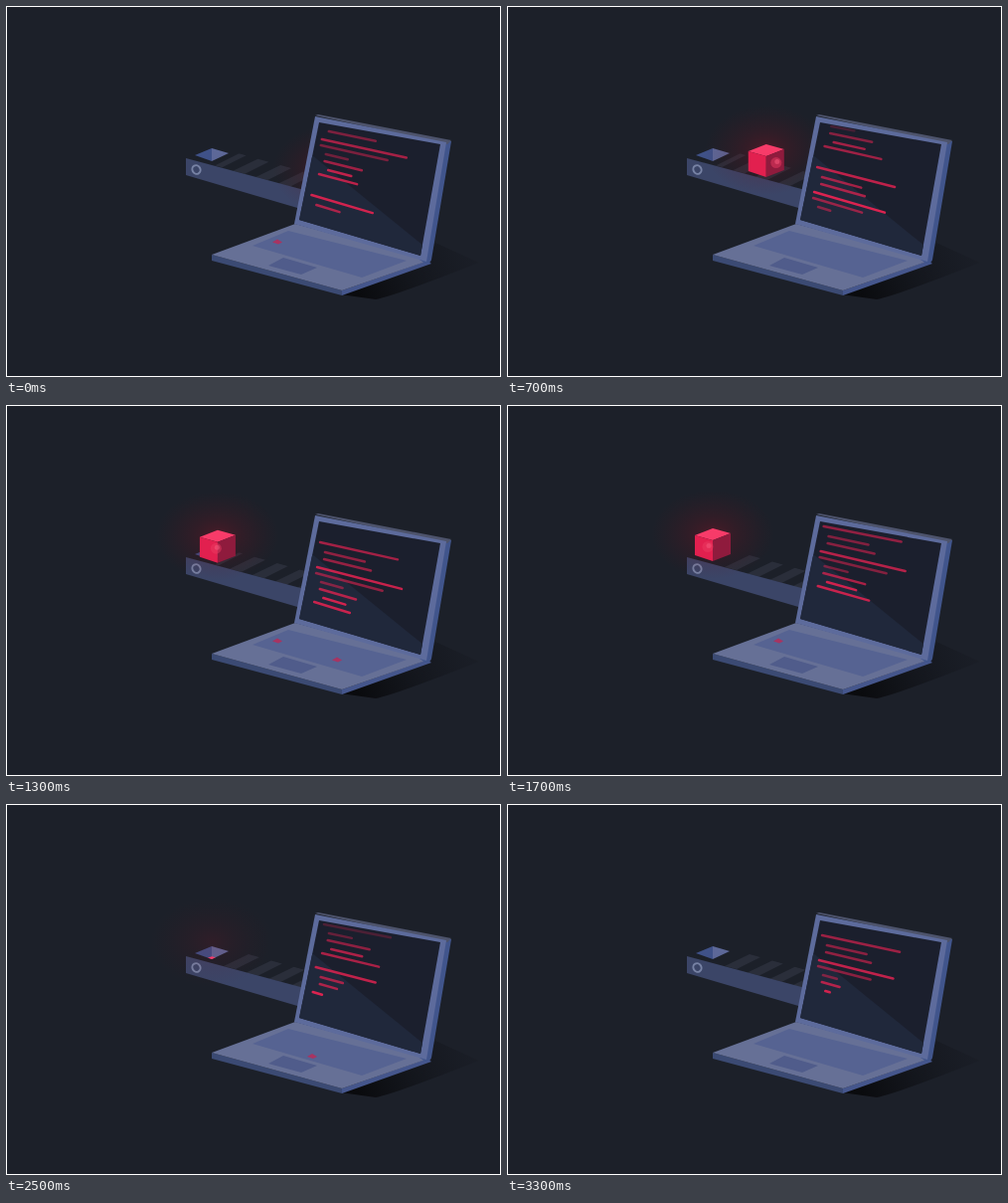
An HTML page that plays this animation: 498x373 px, repeating every 3400 ms.

```html
<!DOCTYPE html>
<html lang="en">
<head>
<meta charset="utf-8">
<title>Laptop and conveyor</title>
<style>
  html, body { margin: 0; width: 100%; height: 100%; overflow: hidden; background: #fff; }
  svg { display: block; width: 498px; height: 373px; }
</style>
</head>
<body>
<svg viewBox="0 0 498 373">
  <defs>
    <radialGradient id="glowFill">
      <stop offset="0" stop-color="#a01024" stop-opacity=".34"/>
      <stop offset=".4" stop-color="#80101f" stop-opacity=".2"/>
      <stop offset="1" stop-color="#60101a" stop-opacity="0"/>
    </radialGradient>
    <linearGradient id="shadowFill" gradientUnits="userSpaceOnUse" x1="355" y1="288" x2="470" y2="246">
      <stop offset="0" stop-color="#0a0b0e"/>
      <stop offset="1" stop-color="#171a22" stop-opacity=".35"/>
    </linearGradient>
    <clipPath id="stage"><path d="M1 1H497V372H1Z"/></clipPath>
    <clipPath id="beltTop"><path d="M235 148L320 172V193L209 161Z"/></clipPath>
    <clipPath id="aboveHole"><path d="M185 80H400V240H260L224 166V148L207 156L190 150H185Z"/></clipPath>
    <clipPath id="fallArea"><path d="M185 80H229V148H224L207 156L190 150H185Z"/></clipPath>
    <clipPath id="screen"><path d="M315 117L437 139L417 251L295 215Z"/></clipPath>
  </defs>
  <g clip-path="url(#stage)">
    <path fill="#1c2029" d="M1 1H497V372H1Z"/>

    <g id="belt">
      <g id="stripes" clip-path="url(#beltTop)" fill="#2a2e3a"></g>
      <path fill="#3b4567" d="M181 153L300 185V205L181 170Z"/>
      <ellipse cx="191.5" cy="164.5" rx="4" ry="4.4" transform="rotate(-30 191.5 164.5)" fill="none" stroke="#7782a4" stroke-width="2"/>
      <path fill="#3f5188" d="M190 150L207 143V156Z"/>
      <path fill="#5d6898" d="M207 143L224 148L207 156Z"/>
    </g>

    <ellipse id="glow" rx="62" ry="45" fill="url(#glowFill)"/>
    <g id="cubeClip">
      <g id="cube">
        <path fill="#f73b69" d="M-18 7L0 0L18 5L0 12Z"/>
        <path fill="#e2204f" d="M-18 7L0 12V33L-18 27Z"/>
        <path fill="#8f1b3d" d="M0 12L18 5V26L0 33Z"/>
        <g id="orb">
          <circle r="5.5" fill="#e93a62" opacity=".5"/>
          <circle cx="1" cy="-1" r="2.5" fill="#f5587c" opacity=".55"/>
        </g>
      </g>
    </g>

    <path fill="url(#shadowFill)" d="M336 290L372 295Q392 291 476 258L432 238L420 258Z"/>

    <path fill="#3b4a73" d="M207 250L338 286V291L207 256Z"/>
    <path fill="#45568c" d="M338 286L424 256L428 259L338 291Z"/>
    <path fill="#667096" d="M291 219L425 256L338 286L207 250Z"/>
    <path fill="#566392" d="M284 226L403 256L358 273L248 241Z"/>
    <path fill="#505c8b" d="M279 253L313 263L297 270L264 261Z"/>
    <g id="keys" fill="#b62b59"></g>

    <path fill="#41558c" d="M440 136L448 136L428 255Q427 259 422 259L416 255Z"/>
    <path fill="#4d536b" d="M311 110L314 109L448 135L444 139Z"/>
    <path fill="#5d6b9c" d="M311 111L443 137L423 257L290 219Z"/>
    <g clip-path="url(#screen)">
      <path fill="#1b1f2d" d="M290 105H445V260H290Z"/>
      <path fill="#20283b" d="M308 150L420 241V260H285V150Z"/>
      <g id="code" stroke="#dc2350" stroke-width="2.5" stroke-linecap="round"></g>
    </g>
  </g>
</svg>
<script>
const LOOP = 3400, STEP = 100;
const PITCH = 22.8, SLOPE = 0.28;

const $ = id => document.getElementById(id);
const clamp = (v, lo = 0, hi = 1) => Math.min(hi, Math.max(lo, v));
const progress = (t, from, to) => clamp((t - from) / (to - from));
const easeInOut = u => (1 - Math.cos(Math.PI * u)) / 2;
const easeOut = u => 1 - (1 - u) ** 2;

function add(parent, tag, attrs = {}) {
  const el = document.createElementNS("http://www.w3.org/2000/svg", tag);
  for (const k in attrs) el.setAttribute(k, attrs[k]);
  parent.append(el);
  return el;
}
const move = (el, x, y) => el.setAttribute("transform", `translate(${x.toFixed(2)} ${y.toFixed(2)})`);

// One block of code lines: y offset, indent, full length, opacity
const LINES = [
  [0, 4.5, 78, .95], [10, 11, 40, .75], [17, 11.3, 47, .75],
  [25, 5.6, 85, 1], [31, 5.6, 67, .65], [40, 12, 23, .55],
  [47, 12, 42, .8], [56, 17, 31, .95], [60, 8.5, 57, .9]
];
// Each block: y at time zero, y at which its lines begin to be typed
const BLOCKS = [[109, 192], [190, 219], [264, 192]];

const codeLines = BLOCKS.flatMap(([top, typeY]) =>
  LINES.map(([dy, indent, length, alpha]) =>
    ({ el: add($("code"), "line"), y0: top + dy, typeY, indent, length, alpha })));

// Key presses: x, y, start, end
const keys = [[273, 237, -100, 600], [273, 237, 1150, 1950], [333, 256, 750, 1600], [308, 253.5, 2250, 2850]]
  .map(([x, y, from, to]) => ({
    from, to,
    el: add($("keys"), "path", { d: `M${x - 5} ${y + .5}L${x} ${y - 2.5}L${x + 5} ${y + .5}L${x + 1} ${y + 2.5}Z` })
  }));

const stripes = Array.from({ length: 6 }, () =>
  add($("stripes"), "path", { d: "M244 151L255 154L231 166L219 163Z" }));

function drawCode(t) {
  for (const { el, y0, typeY, indent, length, alpha } of codeLines) {
    const y = y0 - 0.04 * t;
    const len = length * easeOut(clamp((typeY - y) / 54));
    const x = 315 - 0.165 * (y - 117) + indent;
    const edge = clamp((204 - y) / 2) * clamp((y - 119.5) / 2.5);
    const depth = 0.65 + 0.35 * progress(y, 122, 180);
    el.setAttribute("x1", x);
    el.setAttribute("y1", y);
    el.setAttribute("x2", x + len);
    el.setAttribute("y2", y + len * (0.2 + 0.0014 * (y - 122)));
    el.setAttribute("opacity", len > 0.5 ? alpha * edge * depth : 0);
  }
}

function draw(t) {
  const left = 143 * (1 - easeInOut(progress(t, -500, 1570)));
  const drop = 33 * easeInOut(progress(t, 1800, 2700));
  const x = 207 + left, y = 124 + SLOPE * left;

  stripes.forEach((el, i) => {
    const shift = left % PITCH + (i - 2) * PITCH;
    move(el, shift, shift * SLOPE);
  });

  move($("cube"), x, y + drop);
  $("cubeClip").setAttribute("clip-path", drop > 0 ? "url(#fallArea)" : "none");
  $("cubeClip").setAttribute("visibility", drop < 33 ? "visible" : "hidden");
  move($("orb"), Math.min(10, -5 + 11 * (Math.max(0, 1700 - t) / 800) ** 1.7), 18.5);

  move($("glow"), x, y + 6 + drop * 0.3);
  $("glow").setAttribute("opacity", 1 - progress(t, 2000, 2900));

  for (const { el, from, to } of keys)
    el.setAttribute("opacity", 0.85 * Math.min(progress(t, from, from + 100), 1 - progress(t, to - 200, to)));

  drawCode(t);
}

function tick(now) {
  draw(Math.floor((now % LOOP) / STEP) * STEP);
  requestAnimationFrame(tick);
}
draw(0);
requestAnimationFrame(tick);
</script>
</body>
</html>
```
